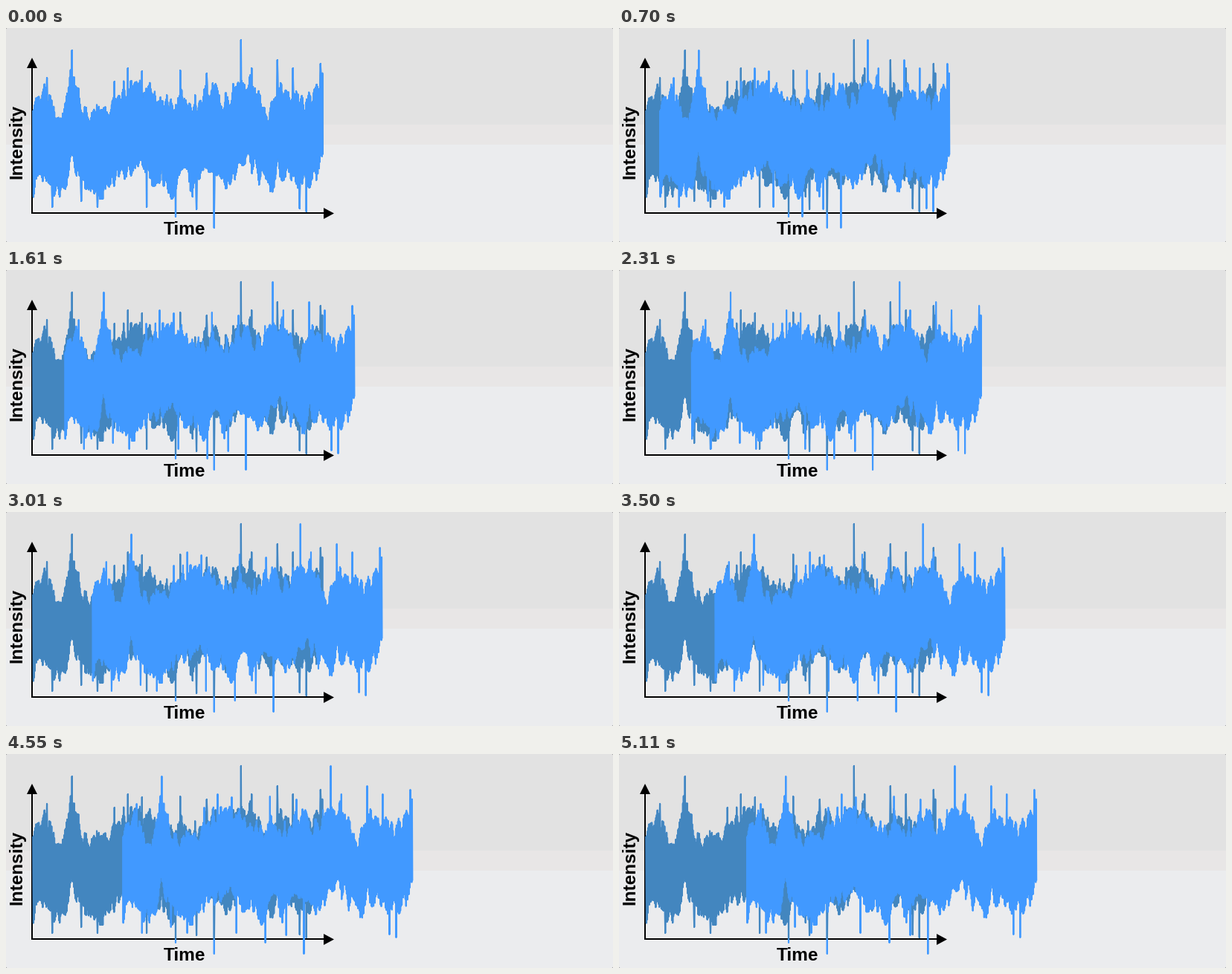
A matplotlib script that plays this animation: 816 by 288 pixels, repeating every 5180 ms.

```python
import numpy as np
import matplotlib.pyplot as plt
from matplotlib.animation import FuncAnimation
from matplotlib.patches import FancyBboxPatch, Polygon, Rectangle

W, H, DPI = 816, 288, 100
FRAMES, INTERVAL = 74, 70
SPEED = 1.856          # pixels per frame
X0, X1, AXIS_Y = 36.5, 425.7, 249
PX = 72 / DPI          # points per pixel
LIGHT, DARK = "#4199ff", "#4386bf"

# Slow drift of the trace and its tallest spikes, as (x, y) in pixels
DRIFT = [(36, 170), (50, 137), (66, 168), (76, 168), (88, 120), (100, 158),
         (126, 170), (150, 140), (180, 135), (212, 147), (226, 172),
         (236, 138), (256, 164), (270, 138), (300, 156), (316, 122),
         (332, 130), (356, 170), (366, 137), (405, 156), (426, 118)]
SPIKES = [(55, 66), (62, 242), (89, 29), (101, 234), (123, 242), (146, 71),
          (164, 53), (183, 57), (189, 242), (228, 255), (234, 56), (256, 245),
          (270, 60), (280, 270), (316, 15), (330, 53), (365, 42), (386, 53),
          (395, 244), (404, 248), (423, 47)]


def make_trace(n=820, grain=3.2):
    """Dense zigzag around the drift, with a few sharp spikes."""
    rng = np.random.default_rng(7)
    x = np.linspace(X0, X1, n)
    knots = np.arange(X0, X1 + grain, grain)

    def reach():
        slow = np.interp(x, knots, rng.uniform(40, 74, len(knots)))
        return slow * rng.uniform(0.85, 1, n)

    drift = np.interp(x, *np.array(DRIFT).T)
    up = np.arange(n) % 2 == 0
    y = np.clip(np.where(up, drift - reach(), drift + reach()), 56, 230)
    for sx, sy in SPIKES:
        y[np.abs(x - sx).argmin()] = sy + (1 if sy < AXIS_Y / 2 else -1)
    return x, y


fig = plt.figure(figsize=(W / DPI, H / DPI), dpi=DPI, facecolor="#8c8c8c")
ax = fig.add_axes([0, 0, 1, 1])
ax.set_xlim(0, W)
ax.set_ylim(H, 0)
ax.axis("off")

# Backdrop: three grey bands in a panel with slightly rounded corners
panel = FancyBboxPatch((0, 0), W, H, boxstyle="round,pad=0,rounding_size=2",
                       fc="none", ec="none")
ax.add_patch(panel)
for top, bottom, color in ((0, 130, "#e2e2e2"), (130, 157, "#e8e6e6"),
                           (157, H, "#ebecee")):
    band = ax.add_patch(Rectangle((0, top), W, bottom - top, fc=color,
                                  ec="none", zorder=0))
    band.set_clip_path(panel)

# Axes with arrowheads and labels
ax.plot([35, 35, 430], [50, AXIS_Y, AXIS_Y], color="black", lw=2 * PX,
        solid_joinstyle="miter", zorder=2)
for tip in ([(35, 40), (28, 54), (42, 54)],
            [(441, 249.5), (427, 242), (427, 257)]):
    ax.add_patch(Polygon(tip, fc="black", ec="none", zorder=2))
font = dict(family="Liberation Sans", weight="bold", size=24.4 * PX,
            color="black", ha="center", va="baseline", zorder=2)
ax.text(240.5, 278, "Time", **font)
ax.text(21.5, 153, "Intensity", rotation=90, rotation_mode="anchor", **font)

x, y = make_trace()


def draw_trace(color, z):
    return ax.plot(x, y, color=color, lw=2.1 * PX, solid_joinstyle="round",
                   zorder=z)[0]


# The fixed trace is dark above the time axis and light below it
draw_trace(LIGHT, 3)
shadow = draw_trace(DARK, 4)
shadow.set_clip_path(Rectangle((0, 0), W, AXIS_Y, transform=ax.transData))
moving = draw_trace(LIGHT, 5)


def update(i):
    moving.set_xdata(x + SPEED * i)
    return (moving,)


anim = FuncAnimation(fig, update, frames=FRAMES, interval=INTERVAL,
                     repeat=True, repeat_delay=0, blit=False)
plt.show()
```
